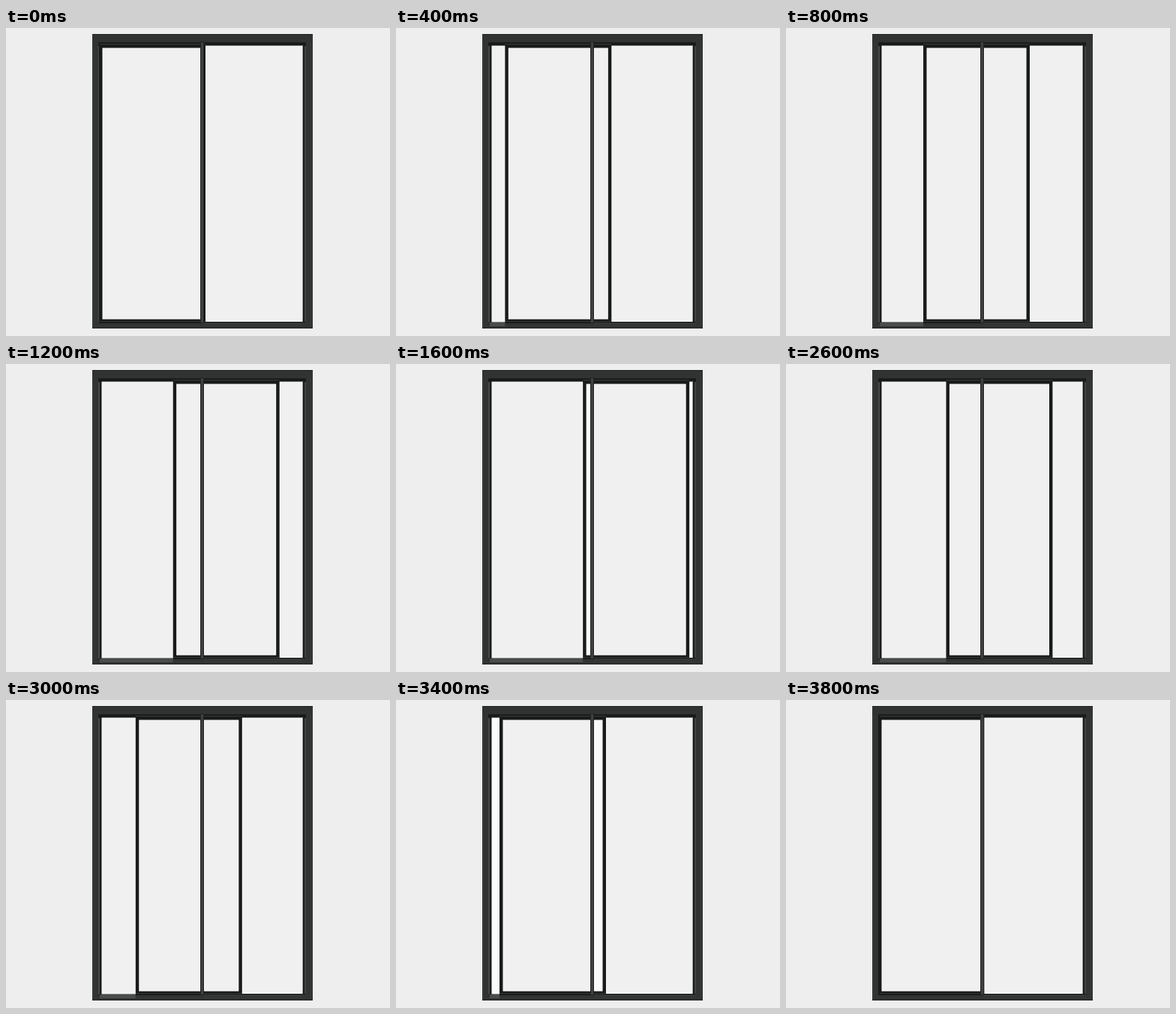
An HTML page with a canvas for the animation above (4 s loop, 512x410 px).

```html
<!DOCTYPE html>
<html>
<head>
<meta charset="utf-8">
<style>
html, body { margin: 0; width: 100%; height: 100%; overflow: hidden; background: #eee; }
canvas { display: block; }
</style>
</head>
<body>
<canvas id="stage" width="512" height="410"></canvas>
<script>
const ctx = document.getElementById('stage').getContext('2d');
const LOOP = 4000, STEP = 200;
const STILE = 4.5, SPAN = 137.5; // sliding sash: stile width, distance between stiles

// Fills a box given by its left, top, right and bottom edges.
function box(color, x0, y0, x1, y1) {
  if (x1 <= x0) return;
  ctx.fillStyle = color;
  ctx.fillRect(x0, y0, x1 - x0, y1 - y0);
}

// Clear area with a bright rim; narrow gaps look fully bright.
function pane(x0, y0, x1, y1) {
  box('#fafafa', x0, y0, x1, y1);
  if (x1 - x0 > 12) box('#f0f0f0', x0 + 1, y0 + 1, x1 - 1, y1 - 1);
}

function sashLeft(t) {
  return 188.2 - 66 * Math.cos(2 * Math.PI * (t + 150) / LOOP);
}

function draw(t) {
  const left = sashLeft(t), right = left + SPAN;
  box('#eee', 0, 0, 512, 410);

  // Outer frame and its grooves
  box('#313332', 115, 8, 409, 400);
  box('#1f2120', 115, 8, 409, 9);
  box('#1f2120', 115, 399, 409, 400);
  box('#393b3a', 116, 20, 117, 398);
  box('#393b3a', 406, 20, 407, 398);
  box('#191b1a', 123, 19, 400, 393);
  box('#484a49', 123, 24, 125, 392);
  box('#424443', 398, 24, 400, 391);
  box('#4a4c4b', 125, 392, left, 397);
  box('#343635', 264, 392, 400, 397);

  // Sliding sash
  box('#191b1a', Math.max(left, 123), 22, right + STILE, 392);
  box('#383a39', Math.max(left, 125), 21, right + STILE, 22);
  box('#343635', Math.max(left, 125), 390, right + STILE, 391);

  // Clear areas between the stiles
  pane(127.5, 23.5, left, 391.5);
  pane(Math.max(127.5, left + STILE), 26.5, Math.min(259, right), 387.7);
  pane(264, 26.5, right, 387.7);
  pane(Math.max(264, right + STILE), 23.5, 396, 391);
  box('#a0a2a1', 395, 24, 396, 391);

  // Fixed middle stile
  box('#222423', 259, 18, 264, 393);
  box('#3f4140', 260, 19, 263, 392);
}

function tick(now) {
  draw(Math.floor(now % LOOP / STEP) * STEP);
  requestAnimationFrame(tick);
}
draw(0);
requestAnimationFrame(tick);
</script>
</body>
</html>
```
